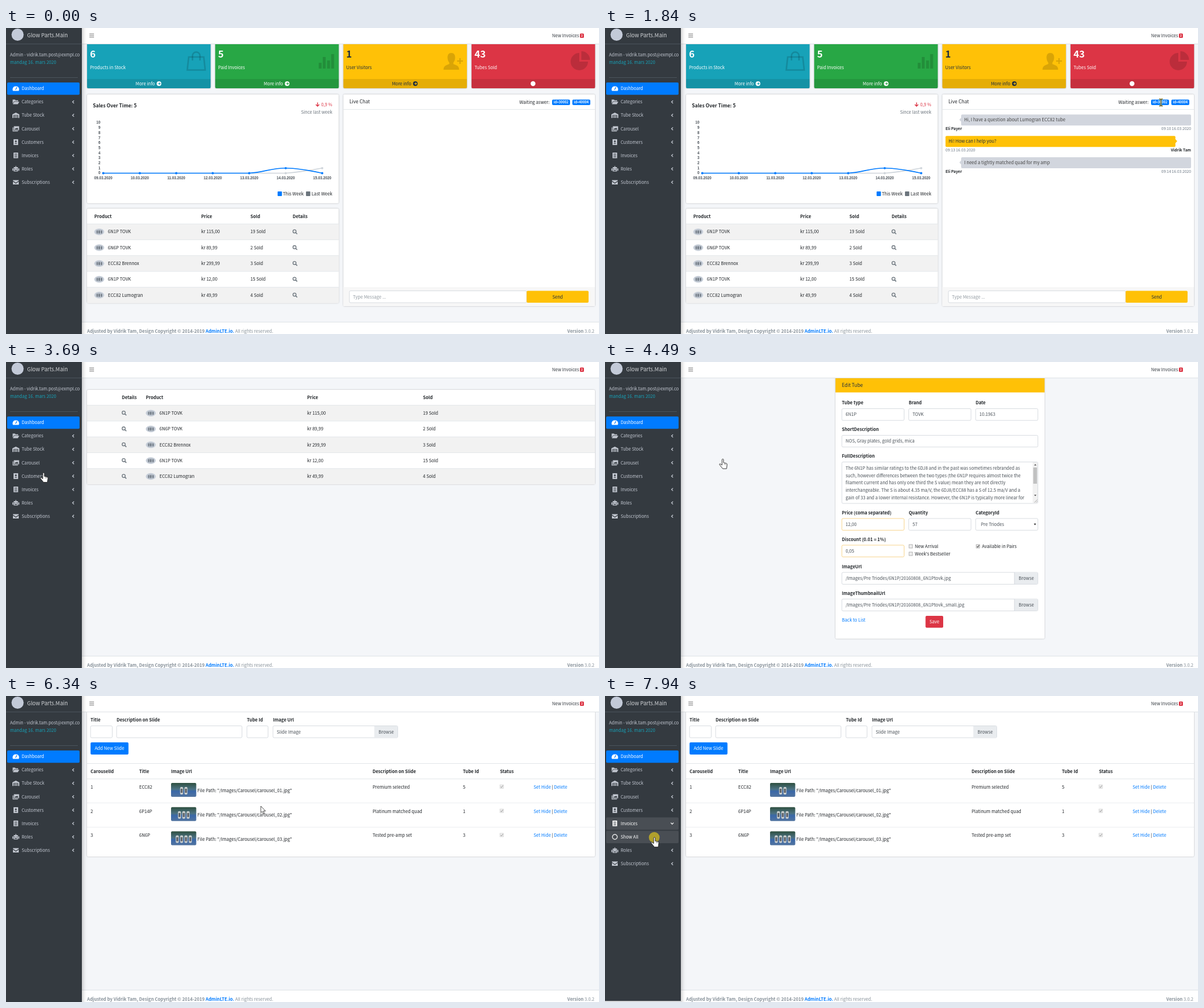
These frames come from a looping animation (1024x528 px, 8000 ms). An HTML page:

```html
<!DOCTYPE html>
<html lang="en">
<head>
<meta charset="utf-8">
<title>Shop admin</title>
<style>
html,body{margin:0;width:100%;height:100%;overflow:hidden;background:#f4f6f9}
svg{display:block;width:100vw;height:100vh}
text{font-family:"Noto Sans CJK JP","Noto Sans CJK SC","Noto Sans CJK KR","Noto Sans",sans-serif;white-space:pre}
.b{font-weight:700}
.m{text-anchor:middle}
.e{text-anchor:end}
.win{font-family:"Open Sans","Noto Sans",sans-serif}
.axis{font-family:"Liberation Sans",Arial,sans-serif;font-weight:700}
.card{filter:drop-shadow(0 .5px .8px rgba(0,0,0,.28))}
.side{filter:drop-shadow(0 3px 4px rgba(0,0,0,.35))}
.dialog{filter:drop-shadow(1px 2px 3px rgba(0,0,0,.4))}
</style>
</head>
<body>
<svg id="stage" viewBox="0 0 1024 528"></svg>
<script>
const INK = '#212529', MUTED = '#6c757d', BLUE = '#007bff', RED = '#dc3545', YELLOW = '#ffc107',
      LINE = '#dee2e6', FIELD = '#ced4da', VALUE = '#495057', PALE = '#c2c7d0', AMBER = '#f6cb72';

// y is the middle of the capital letters
const text = (x, y, s, fill = INK, cls = '', size = 7.63) =>
  `<text x="${x}" y="${y + size * .365}" fill="${fill}" class="${cls}" font-size="${size}">${s}</text>`;
const bold = (x, y, s, fill = INK, size = 7.6) => text(x, y, s, fill, 'b', size);
const rect = (x, y, r, b, fill, extra = '') =>
  `<rect x="${x}" y="${y}" width="${r - x}" height="${b - y}" fill="${fill}" ${extra}/>`;
const path = (d, fill, extra = '') => `<path d="${d}" fill="${fill}" ${extra}/>`;
const line = (d, color, w = 1) => path(d, 'none', `stroke="${color}" stroke-width="${w}"`);
const dot = (x, y, r, fill) => `<circle cx="${x}" cy="${y}" r="${r}" fill="${fill}"/>`;
const at = (x, y, s) => `<g transform="translate(${x} ${y})">${s}</g>`;
const card = (x, y, r, b) => rect(x, y, r, b, '#fff', 'rx="2" class="card"');
const field = (x, y, r, b, s = '', color = FIELD) =>
  rect(x, y, r, b, '#fff', `rx="2" stroke="${color}" stroke-width=".8"`) + text(x + 6.5, (y + b) / 2, s, VALUE);
const button = (x, y, r, b, s, fill, ink = '#fff') =>
  rect(x, y, r, b, fill, 'rx="2"') + text((x + r) / 2, (y + b) / 2, s, ink, 'm');
const check = (x, y, on) => rect(x - 3, y - 3, x + 3, y + 3, on ? '#e6e6e6' : '#eee', 'stroke="#999" stroke-width=".7"') +
  (on ? line(`M${x - 1.8} ${y}l1.4 1.6 2.6-3.4`, '#555', 1.1) : '');
const goIcon = (x, y, fill, arrow) => dot(x, y, 4, fill) + line(`M${x - 2} ${y}h4m-1.8-1.9l1.9 1.9-1.9 1.9`, arrow, 1.1);

const ICONS = [
  '<path d="M-5 4a5.6 5.6 0 1 1 10 0z"/><path d="M-.6 2L2-2.4" stroke="#007bff" stroke-width="1.2"/>',
  '<path d="M-5.5 3v-7h4l1 1.2h4.5v1.8h-7z"/><path d="M-2.8-.3h8.8l-2.6 4.3h-8.6z"/>',
  '<path d="M-6 4.5v-6.2l6-3 6 3v6.2h-1.8v-5h-8.4v5z"/><path d="M-3.4.5h6.8v1.2h-6.8zM-3.4 2.7h6.8v1.4h-6.8z"/>',
  '<path d="M-3.4-4.4h9v7h-9zm1.2 5.8h6.6l-2-3.2-1.6 1.6-1-.8z" fill-rule="evenodd"/><path d="M-5.5-2.4h1.3v5.8h7.8v1.2h-9.1z"/>',
  '<path d="M-4-5h8v10h-8z"/><circle cy="-1.4" r="1.5" fill="#343a40"/><path d="M-2.3 2.6q2.3-3 4.6 0z" fill="#343a40"/>',
  '<path d="M-4-5h8v10l-1.3-.8-1.3.8L0 4.2l-1.4.8-1.3-.8L-4 5z"/><path d="M-2.4-2.5h4.8M-2.4 0h4.8M-2.4 2.3h4.8" stroke="#343a40"/>',
  '<path d="M-.6-5h1.2v2h3v7.5h-7.2v-7.5h3zM-6-.8h1.6v4H-6zM4.4-.8H6v4H4.4z"/><path d="M-2.2-.2h1.2M1-.2h1.2M-2 2.6h4" stroke="#343a40" stroke-width="1.2"/>',
  '<path d="M-5-3.8H5v1.2L0 .9-5-2.6z"/><path d="M-5-1.3L0 2.2 5-1.3v5H-5z"/>'
];
const MENU = [['Dashboard'], ['Categories'], ['Tube Stock', 'Add New', 'Show All'], ['Carousel', 'Edit Slideshow'],
  ['Customers'], ['Invoices', 'Show All'], ['Roles'], ['Subscriptions']];

// open: index of the unfolded entry; hover: "entry" or "entry.child"
function sidebar(open, hover) {
  let s = rect(0, -9, 131, 540, '#343a40', 'class="side"') + dot(20, 11.5, 10.5, '#c3cad8') +
    text(36.5, 12.5, 'Glow Parts.Main', '#d3d5d8', '', 9.35) + line('M0 27.5H131M7 85.5H124', '#4b545c') +
    text(7, 46, 'Admin - vidrik.tam.post@exmpl.co', PALE, '', 7.5) + text(7, 59, 'mandag 16. mars 2020', '#17a2b8');
  let y = 104.5;
  const row = (label, icon, key, active, lit) => {
    const ink = active || lit ? '#fff' : PALE;
    if (active || lit) s += rect(2, y - 10.5, 127, y + 10.8, active ? BLUE : '#494e54', 'rx="2"');
    s += at(17, y, `<g fill="${ink}">${icon}</g>`) + text(27, y, label, ink);
    if (MENU[key] && !active) s += line(open === key ? `M113.6 ${y - 1.4}l2.4 2.5 2.4-2.5` : `M117.4 ${y - 2.4}l-2.5 2.4 2.5 2.4`, ink, 1.3);
    y += 23.1;
  };
  MENU.forEach(([name, ...kids], i) => {
    row(name, ICONS[i], i, i === 0, open === i || hover === `${i}`);
    if (open === i) kids.forEach((kid, k) => {
      const lit = hover === `${i}.${k}`;
      row(kid, `<circle r="4.2" fill="none" stroke="${lit ? '#fff' : PALE}" stroke-width="1.2"/>`, 'kid', false, lit);
    });
  });
  return s;
}

function frame() {
  return rect(0, 0, 1024, 528, '#f4f6f9') + rect(131, 508, 1024, 528, '#fff') + line('M131 507.5H1024', LINE) +
    text(140, 523, `<tspan class="b">Adjusted by Vidrik Tam, Design Copyright © 2014-2019 <tspan fill="${BLUE}">AdminLTE.io.</tspan></tspan> All rights reserved.`, '#869099') +
    text(1016, 523, '<tspan class="b">Version</tspan> 3.0.2', '#869099', 'e');
}
function navbar() {
  return rect(131, 0, 1024, 27, '#fff') + line('M131 27.5H1024', LINE) +
    line('M144 10.2h8M144 13h8M144 15.8h8', '#777') + text(943, 13, 'New Invoices', '#343a40') +
    rect(991, 9.5, 998, 17, RED, 'rx="1.5"') + text(994.5, 13.3, '2', '#fff', 'b m', 5);
}

const PRODUCTS = [['6N1P TOVK', '115,00', 19], ['6N6P TOVK', '89,99', 2], ['ECC82 Brennox', '299,99', 3],
  ['6N1P TOVK', '12,00', 15], ['ECC82 Lumogran', '49,99', 4]];

function products(right, top, [thumb, name, price, sold, find]) {
  let s = card(140, top, right, top + 163);
  [[thumb - 8.5, 'Product'], [price, 'Price'], [sold, 'Sold'], [find - 4, 'Details']].forEach(([x, h]) => s += bold(x, top + 13.5, h));
  PRODUCTS.forEach(([label, cost, n], i) => {
    const y = top + 40.2 + 27.3 * i;
    s += rect(140, y - 13.6, right, y + 13.7, i % 2 ? '#fff' : '#f2f2f2') + line(`M140 ${y - 13.6}H${right}`, LINE, .8) +
      at(thumb, y, `<ellipse rx="8.7" ry="5.8" fill="url(#thumb)"/>` + [-4.5, -1, 3].map(x => rect(x, -2.5, x + 2, 3, '#59626e', 'rx="1" opacity=".7"')).join('')) +
      text(name, y, label) + text(price, y, 'kr ' + cost) + text(sold, y, n + ' Sold') +
      `<circle cx="${find - .8}" cy="${y - .8}" r="2.7" fill="none" stroke="${MUTED}" stroke-width="1.3"/>` + line(`M${find + 1} ${y + 1}l2.8 2.8`, MUTED, 1.6);
  });
  return s;
}

function boxes() {
  const shade = 'rgba(0,0,0,.15)';
  const art = [
    `<g fill="none" stroke="${shade}" stroke-width="2.6"><path d="M315.5 50h26l2.5 22.5h-31z"/><path d="M322 56v-8a6.5 6.5 0 0 1 13 0v8"/></g>`,
    path('M540 60h5v10h-5zM547 50h5v20h-5zM554.5 56h5v14h-5zM561.5 45h5v25h-5z', shade),
    path('M769 43c5 0 7 4 6.5 9s-2 6-3 8v2c3 2 10 2 10 10h-27c0-8 7-8 10-10v-2c-1-2-2.5-3-3-8s1.5-9 6.5-9zM783 52h2v4h4v2h-4v4h-2v-4h-4v-2h4z', shade),
    path('M990 43a15 15 0 1 0 15 15h-15zM993.5 40a15 15 0 0 1 15 15h-15z', shade)
  ];
  return [['6', 'Products in Stock', '#17a2b8'], ['5', 'Paid Invoices', '#28a745'], ['1', 'User Visitors', YELLOW], ['43', 'Tubes Sold', RED]]
    .map(([n, label, fill], i) => {
      const x = 140 + 221.3 * i, mid = x + 106.7, ink = i === 2 ? '#1f2d3d' : '#fff';
      return rect(x, 24, x + 213.3, 104, fill, 'rx="2" class="card"') + rect(x, 88, x + 213.3, 104, 'rgba(0,0,0,.1)') +
        bold(x + 5, 45, n, ink, 16.5) + text(x + 5, 68, label, ink) + art[i] +
        (i < 3 ? text(mid - 6.2, 96, 'More info', ink, 'm') + goIcon(mid + 17.5, 96, ink, fill) : dot(mid - .5, 96, 4.2, '#fff'));
    }).join('');
}

function chart() {
  const px = i => 168 + 63 * i, py = v => 250.5 - 8.7 * v;
  let s = card(140, 114.5, 574.5, 302.5) + bold(150, 133.5, 'Sales Over Time: 5', INK, 8.4) +
    line('M538 128.5v6.5m-3-3l3 3 3-3', RED, 1.4) + text(563.5, 132, '0,9 %', RED, 'e') + text(563.5, 145, 'Since last week', MUTED, 'e');
  for (let v = 0; v <= 10; v++) s += text(163, py(v) - .3, v, VALUE, 'axis e', 6.3);
  for (let i = 0; i < 7; i++) s += text(px(i), 259, `${i < 1 ? '0' : ''}${9 + i}.03.2020`, VALUE, 'axis m', 6.3);
  const series = (values, d, color) => line(d, color, 1.6) + values.map((v, i) => dot(px(i), py(v), 1.9, color)).join('');
  s += series([0, 0, 0, 0, 0, 0, 1], 'M168 250.5H483C508 248.8 546 241.8 546 241.8', FIELD) +
    series([0, 0, 0, 0, 0, 1, 0], 'M168 250.5H420C445 248.8 458 241.8 483 241.8C508 241.8 546 250.5 546 250.5', BLUE);
  return s + rect(469, 282, 476.5, 290, BLUE, 'rx="1"') + text(478, 286, 'This Week') +
    rect(518, 282, 525.5, 290, MUTED, 'rx="1"') + text(563.5, 286, 'Last Week', INK, 'e');
}

function chat(full) {
  let s = card(582.5, 114.5, 1017, 480) + line('M582.5 140.5H1017', LINE, .8) + text(593, 126.5, 'Live Chat', INK, '', 8.25) +
    text(886.5, 128, 'Waiting aswer:') + rect(582.5, 447, 1017, 480, '#f7f7f7') + field(593, 453.5, 899, 474) +
    text(599, 464, 'Type Message ...', '#939ba2') + button(899, 453.5, 1006, 474, 'Send', YELLOW, '#1f2d3d');
  [[943, 'id=30002'], [978, 'id=40004']].forEach(([x, id]) => s += rect(x, 123.5, x + 31, 133, BLUE, 'rx="2"') + text(x + 15.5, 128.4, id, '#fff', 'b m', 5.65));
  if (!full) return s;
  const say = (y, mine, msg, time) => {
    const x = mine ? 588 : 615, fill = mine ? YELLOW : '#d2d6de';
    const tip = mine ? `M985 ${y - 4}l3 3.5-3 3.5z` : `M615 ${y - 4}l-3 3.5 3 3.5z`;
    s += rect(x, y - 9.5, x + 397, y + 9.5, fill, 'rx="2"') + path(tip, fill) + text(x + 5.3, y, msg, mine ? '#1f2d3d' : '#444') +
      text(mine ? 1012 : 588, y + 15.3, mine ? 'Vidrik Tam' : 'Eli Payer', INK, mine ? 'b e' : 'b', 6.65) +
      text(mine ? 588 : 1012, y + 15.3, time + ' 16.03.2020', '#697582', mine ? '' : 'e', 6.65);
  };
  say(158.7, 0, 'Hi, I have a question about Lumogran ECC82 tube', '09:10');
  say(195.7, 1, 'Hi! How can I help you?', '09:13');
  say(232.5, 0, 'I need a tightly matched quad for my amp', '09:14');
  return s;
}

const dashboard = full => boxes() + chart() + products(574.5, 311.5, [161, 176, 337, 422, 499]) + chat(full);
const stock = () => products(1017, 48, [250, 265, 520, 720, 204]);

function edit() {
  const browse = (y, s) => field(409, y, 747.5, y + 20.5, s) + rect(707, y + .4, 747.2, y + 20.1, '#e9ecef') +
    line(`M707 ${y}v20.5`, FIELD, .8) + text(727.5, y + 10.2, 'Browse', VALUE, 'm');
  let s = card(398, 26, 759, 477.5) + rect(398, 27, 759, 52.5, YELLOW) + text(409, 40, 'Edit Tube', '#1f2d3d', '', 8.25);
  [[409, 70, 'Tube type'], [524.5, 70, 'Brand'], [640, 70, 'Date'], [409, 116, 'ShortDescription'], [409, 162, 'FullDescription'],
   [409, 260, 'Price (coma separated)'], [524.5, 260, 'Quantity'], [640, 260, 'CategoryId'], [409, 306, 'Discount (0.01 = 1%)'],
   [409, 353, 'ImageUrl'], [409, 399, 'ImageThumbnailUrl']].forEach(([x, y, l]) => s += bold(x, y, l));
  [[0, 80.5, '6N1P'], [1, 80.5, 'TOVK'], [2, 80.5, '10.1963'], [0, 270, '12,00', AMBER], [1, 270, '57'], [2, 270, ''], [0, 316, '0,05', AMBER]]
    .forEach(([c, y, v, color]) => s += field(409 + 115.5 * c, y, 516.5 + 115.5 * c, y + 20.3, v, color));
  s += text(649, 280.3, 'Pre Triodes', VALUE) + path('M740.5 278.8h4l-2 3z', '#333') +
    field(409, 126.5, 747.5, 146.7, 'NOS, Gray plates, gold grids, mica') + field(409, 172.5, 747.5, 244);
  ['The 6N1P has similar ratings to the 6DJ8 and in the past was sometimes rebranded as',
   'such, however differences between the two types (the 6N1P requires almost twice the',
   'filament current and has only one third the S value) mean they are not directly',
   'interchangeable. The S is about 4.35 ma/V, the 6DJ8/ECC88 has a S of 12.5 ma/V and a',
   'gain of 33 and a lower internal resistance. However, the 6N1P is typically more linear for']
    .forEach((l, i) => s += text(415.5, 183.3 + 12.7 * i, l, VALUE));
  s += rect(738.5, 173, 747, 243.5, '#f1f1f1') + rect(739.5, 182, 746, 210, '#c1c1c1') +
    path('M741 178.5h4l-2-2.5zM741 229h4l-2 2.5z', '#555') + line('M741.5 242.5l5-5M744.5 242.5l2-2', '#888', .7);
  [[528, 318, 'New Arrival'], [528, 331, "Week's Bestseller"], [644, 318, 'Available in Pairs', 1]]
    .forEach(([x, y, l, on]) => s += check(x, y, on) + text(x + 7, y, l));
  return s + browse(363, '/Images/Pre Triodes/6N1P/20160808_6N1Ptovk.jpg') + browse(409, '/Images/Pre Triodes/6N1P/20160808_6N1Ptovk_small.jpg') +
    text(409, 445, 'Back to List', BLUE) + button(553.5, 438, 584, 458.5, 'Save', RED);
}

function slides() {
  let s = card(140, 24, 1017, 277);
  [[146, 'Title', 183.5], [191, 'Description on Slide', 407.5], [416, 'Tube Id', 452.5], [461, 'Image Url', 676.5]]
    .forEach(([x, l, r]) => s += bold(x, 41, l) + field(x, 51.5, r, 72, x > 460 ? 'Slide Image' : ''));
  s += rect(636, 52, 676.2, 71.6, '#e9ecef') + text(656.5, 62, 'Browse', VALUE, 'm') +
    button(146, 80, 211.5, 101, 'Add New Slide', BLUE) + line('M140 116.5H1017M140 143H1017', LINE, .9);
  [[146, 'CarouselId'], [230, 'Title'], [285, 'Image Url'], [633, 'Description on Slide'], [789, 'Tube Id'], [853, 'Status']]
    .forEach(([x, l]) => s += bold(x, 130, l));
  [['ECC82', 'Premium selected', 5], ['6P14P', 'Platinum matched quad', 1], ['6N6P', 'Tested pre-amp set', 3]].forEach(([title, about, id], i) => {
    const y = 157 + 41.8 * i;
    if (i) s += line(`M140 ${y - 14.3}H1017`, '#e9ecef', .9);
    s += text(146, y, i + 1) + text(230, y, title) + rect(285, y - 7, 328.5, y + 17, 'url(#photo)', 'rx="2"');
    for (let k = 0; k < 2 + i; k++) {
      const x = 307 + (k - (1 + i) / 2) * 7.5;
      s += rect(x - 2.6, y, x + 2.6, y + 13, '#cbd0cf', 'rx="2"') + rect(x - 1.6, y + 3, x + 1.6, y + 10, '#5d6268');
    }
    s += text(330.5, y + 6.3, `File Path: "/Images/Carousel/carousel_0${i + 1}.jpg"`) + text(633, y, about) + text(789, y, id) +
      `<g opacity=".5">${check(856, y - .7, 1)}</g>` + text(911, y, `Set Hide <tspan fill="${INK}">|</tspan> Delete`, BLUE);
  });
  return s;
}

function dialog() {
  const win = (x, y, s, fill = '#111', size = 6.2, cls = '') => text(x, y, s, fill, 'win ' + cls, size);
  const folder = (x, y) => path(`M${x - 3.5} ${y - 3.5}h3l1 1h3v6.5h-7z`, '#f8d775');
  const sheet = (x, y) => rect(x - 3, y - 3.8, x + 3, y + 3.8, '#fff', 'stroke="#7b93ab" stroke-width=".7"') + rect(x - 2, y - 1.5, x + 2, y + 2, '#3379b5');
  const down = (x, y) => path(`M${x - 1.5} ${y - 4}h3v4h2.5l-4 4-4-4h2.5z`, '#2f86cf');
  const block = fill => (x, y) => rect(x - 4, y - 2.5, x + 4, y + 2.5, fill, 'rx=".6"');
  const pc = block('#3b9bd6'), disk = (x, y) => rect(x - 4, y, x + 4, y + 3, '#555');
  const cloud = (x, y) => dot(x, y, 3.6, '#1a7fd0');
  let s = rect(2, -5, 477, 308, '#fff', 'class="dialog"') + rect(2, 0, 477, 13.5, '#f5f6f7') + rect(2, 268, 477, 308, '#f0f0f0') +
    win(11, 6.3, 'Organiser', '#223') + path('M41 5.5h4l-2 2.5zM425 5.5h4l-2 2.5z', '#333') + win(62, 6.3, 'Ny mappe', '#223') +
    line('M411.5 3.5h2M415 3.5h4M411.5 6.5h2M415 6.5h4M411.5 9.5h2M415 9.5h4', '#9aa5b0', .8) +
    rect(441.5, 3, 449, 10, '#fff', 'stroke="#2f86cf"') + rect(446, 3, 449, 10, '#5ba7de') + dot(464.5, 6.5, 4.5, '#1668b0') + win(464.5, 6.7, '?', '#fff', 6.5, 'b m') +
    rect(2, 242, 127, 255, '#d9d9d9');
  [['Nedlastinger', 21, down], ['Dokumenter', 34, sheet], ['Bilder', 47, sheet], ['1112_pro_inf_sis', 60, folder], ['Bachelor IT', 73, folder],
   ['Description', 86, folder], ['Docs', 98.5, folder], ['MyFolder', 115.7, cloud, 1], ['Denne PCen', 133, pc, 1], ['3D-objekter', 146, pc],
   ['Bilder', 158.6, sheet], ['Dokumenter', 171.5, sheet], ['Musikk', 184.3, block('#2f86cf')], ['Nedlastinger', 197, down], ['Skrivebord', 210, pc],
   ['Videoer', 223, block('#444')], ['Primary (C:)', 236, disk], ['Data (D:)', 248.6, disk], ['Nettverk', 265.5, pc, 1]]
    .forEach(([l, y, icon, root], i) => {
      s += icon(root ? 18.5 : 23, y) + win(root ? 25.5 : 29.5, y, l);
      if (i < 3) s += line(`M120.5 ${y + 2}l3.5-3.5m-2-1l3 3`, '#777', .9);
    });
  s += rect(2, 267, 477, 272, '#f0f0f0') + rect(127, 14, 135.5, 267, '#f0f0f0') + rect(127.5, 49, 135, 248, '#cdcdcd') +
    line('M129 21.5l2-2 2 2M129 261.5l2 2 2-2M222 17l2-1.5 2 1.5', '#555', .8) +
    line('M303.5 14v14M389.5 14v14M462.5 14v14', '#e3e3e3', .8);
  [[148, 'Navn'], [306, 'Endringsdato'], [392, 'Type'], [465, 'Støn']].forEach(([x, l]) => s += win(x, 21.7, l, '#4c607a', 5.9));
  ['2020 Foto|13.01.2020 20:22', '2020 List|13.01.2020 20:44', 'Description_Archive|10.12.2019 17:48', 'CO_LAN_LOGO|10.12.2019 17:53',
   'Copper_lanterns_LLC|13.01.2020 09:43', 'Photo_stock|13.01.2020 18:58', '6N1P.jpg|06.10.2014 05:28', '6N1P_small.jpg|10.12.2019 19:57',
   '6N2P.jpg|11.08.2015 07:28', '6N2P_small.jpg|10.12.2019 19:56', 'carousel01.jpg|23.03.2014 20:52', 'carousel02.jpg|06.10.2014 05:38',
   'carousel03.jpg|20.06.2014 18:08'].forEach((row, i) => {
    const [name, date] = row.split('|'), y = 37.4 + 11.22 * i;
    s += (i < 6 ? folder : sheet)(152, y) + win(158.5, y, name) + win(306, y, date, '#6d6d6d', 5.85) + win(392, y, i < 6 ? 'Filmappe' : 'JPG-fil', '#6d6d6d', 6);
  });
  const box = (x, y, r, b, fill, color) => rect(x, y, r, b, fill, `stroke="${color}" stroke-width=".9"`);
  return s + rect(138, 258.5, 475, 267, '#f0f0f0') + rect(147, 259, 435.5, 266.5, '#cdcdcd') + line('M143.5 261l-2 2 2 2M470.5 261l2 2-2 2', '#555', .9) +
    win(93, 278.5, 'Filnavn:', '#111', 6.2, 'e') + box(96.5, 272.5, 360.5, 284.5, '#fff', '#5aa5dc') + box(367, 272.5, 467, 284.5, '#e1e1e1', '#adadad') +
    win(369.5, 278.5, 'Bildefiler (*.xbm;*.tif;*.pjp;*.pjp', '#111', 5.9) + line('M353.5 277.5l2 2 2-2M461 277.5l2 2 2-2', '#555', .8) +
    box(367, 289, 413.5, 300.5, '#e1e1e1', '#adadad') + win(390.5, 294.7, 'Åpne', '#111', 6.2, 'm') +
    box(421.5, 289, 466.5, 300.5, '#cce4f7', '#3d8fd0') + win(444, 294.7, 'Avbryt', '#111', 6.2, 'm') +
    line('M471 307l4-4M474 307l1-1', '#aaa', .8);
}

const BEAM = 'M-3-6q3 0 3 1.5 0-1.5 3-1.5M0-5V5M-3 6q3 0 3-1.5 0 1.5 3 1.5';
const CURSORS = {
  arrow: path('M0 0v11.5l2.6-2.4 1.8 4.2 1.9-.8-1.8-4.1h3.6z', '#fff', 'stroke="#222" stroke-width=".8"'),
  hand: path('M-1.4 1.2a1.3 1.3 0 0 1 2.6 0v5l4.8 1.2q1.6.5 1.4 2.3l-1 6.9h-6.6l-5.4-6.8q-.8-1.6.8-1.6l3.4 2.2z', '#fff', 'stroke="#222" stroke-width=".9" stroke-linejoin="round"') +
    line('M3 7.6v2.3M5 8.1v2.1', '#444', .6),
  beam: line(BEAM, '#e9dc8a', 2.4) + line(BEAM, '#3b3a22', 1.1)
};

const PAGES = { dash: () => dashboard(false), talk: () => dashboard(true), stock, edit, slides };

// start, page, open entry, hovered entry, cursor, x, y, extras
const STEPS = [
  [0, 'dash'],
  [520, 'dash', , , 'arrow', 1008, 146],
  [790, 'dash', , , 'arrow', 985, 42],
  [1050, 'dash', , , 'arrow', 930, 140],
  [1320, 'dash', , , 'arrow', 822, 130],
  [1590, 'dash', , , 'beam', 960, 128, { halo: [960, 128] }],
  [1840, 'talk', , , 'beam', 960, 128.5],
  [2380, 'talk', , , 'arrow', 640, 138],
  [2640, 'talk', , , 'arrow', 300, 146],
  [2900, 'talk', , '2', 'hand', 66, 150, { status: 124 }],
  [3150, 'talk', 2, '2.0', 'hand', 64, 172, { status: 124 }],
  [3420, 'talk', 2, '2.1', 'hand', 65, 191, { halo: [64, 190], status: 124 }],
  [3690, 'stock', , , 'hand', 65, 191],
  [3950, 'stock', , , 'arrow', 120, 182],
  [4220, 'stock', , , 'hand', 203.5, 167.5, { halo: [204, 168] }],
  [4490, 'edit', , , 'hand', 203.5, 167.5],
  [4750, 'edit', , , 'arrow', 148, 170],
  [5020, 'edit', , '3', 'hand', 74, 174, { status: 124 }],
  [5280, 'edit', 3, '3', 'hand', 64, 178, { halo: [64, 178], status: 124 }],
  [5540, 'edit', 3, '3.0', 'hand', 62, 199, { status: 157 }],
  [5810, 'edit', 3, '3.0', 'hand', 62, 199, { status: 286 }],
  [6080, 'slides', , '4', 'hand', 62, 199],
  [6340, 'slides', , , 'arrow', 440, 190],
  [6880, 'slides', , , 'arrow', 436, 298, { halo: [434.5, 297], dialog: true }],
  [7150, 'slides', , , 'arrow', 436, 298],
  [7410, 'slides', , , 'arrow', 150, 240],
  [7690, 'slides', 5, '5', 'hand', 82, 222, { status: 124 }],
  [7940, 'slides', 5, '5.0', 'hand', 85.5, 244, { halo: [85, 244], status: 131 }]
];

const DEFS = `<defs><linearGradient id="photo" x2="0" y2="1"><stop stop-color="#2f5040"/><stop offset=".45" stop-color="#4c7283"/><stop offset=".6" stop-color="#3a68a8"/><stop offset="1" stop-color="#52749f"/></linearGradient>
<radialGradient id="thumb"><stop stop-color="#9aa3ad"/><stop offset="1" stop-color="#cfd6e0"/></radialGradient></defs>`;
const stage = document.getElementById('stage');

function draw([, page, open, hover, cursor, x, y, { halo, status, dialog: modal } = {}]) {
  stage.innerHTML = DEFS + frame() + PAGES[page]() + navbar() + sidebar(open, hover) +
    (status ? rect(0, 526.3, status, 528, '#e8eaec') : '') + (modal ? dialog() : '') +
    (halo ? dot(...halo, 9.3, 'rgba(245,215,20,.6)') : '') + (cursor ? at(x, y, CURSORS[cursor]) : '');
}

let shown;
function tick() {
  const t = performance.now() % 8000;
  const step = STEPS.findLast(s => s[0] <= t);
  if (step !== shown) draw(shown = step);
  requestAnimationFrame(tick);
}
tick();
</script>
</body>
</html>
```
